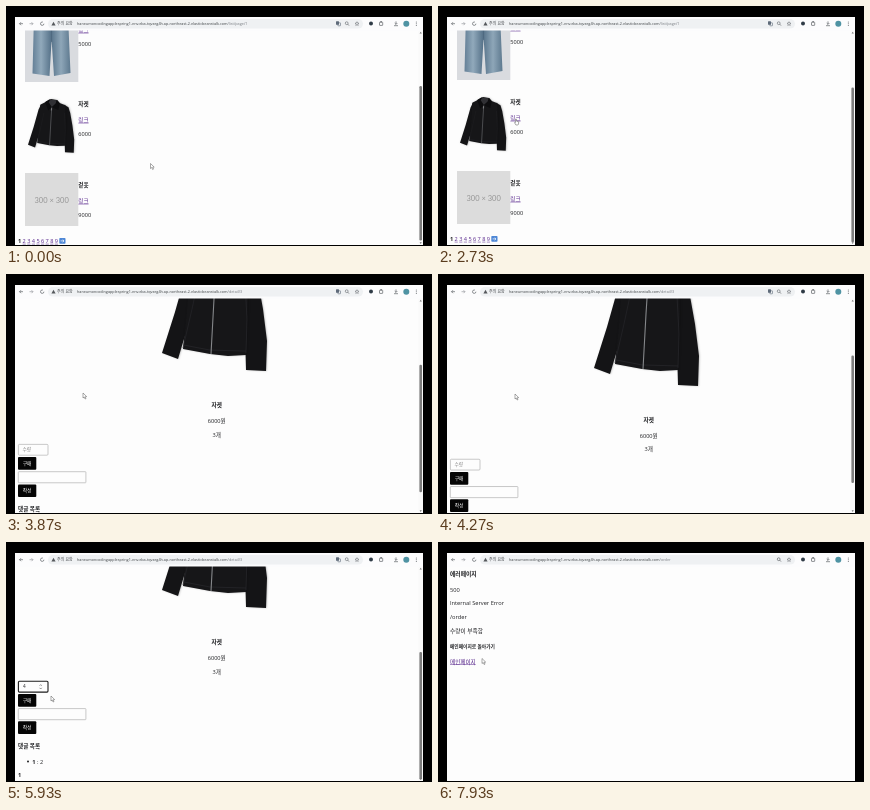
Recreate the animation shown at these times as an HTML page with a canvas. Size 426 by 240 pixels, loop 8 s.

```html
<!DOCTYPE html>
<html lang="ko">
<head>
<meta charset="utf-8">
<title>Shop walkthrough</title>
<style>
html, body { margin: 0; width: 100%; height: 100%; overflow: hidden; background: #000; }
canvas { display: block; width: 426px; height: 240px; }
</style>
</head>
<body>
<canvas id="stage"></canvas>
<script>
const LOOP = 8000, FPS = 15;
const INK = '#202124', LINK = '#55238a', GRAY = '#5f6368';
const FONT = '"Open Sans", "Noto Sans CJK KR", "Noto Sans CJK", sans-serif';
const HOST = 'haneumoncodingapplespring1-env.eba-tqvzeg4h.ap-northeast-2.elasticbeanstalk.com';

const canvas = document.getElementById('stage');
const ctx = canvas.getContext('2d');
const ratio = Math.max(1, window.devicePixelRatio || 1);
canvas.width = 426 * ratio;
canvas.height = 240 * ratio;

// Keyframes: [time, value, value...]
const pointer = [
  [0, 144.5, 157.5], [1933, 144.5, 157.5], [2733, 76.5, 113], [2800, 76, 112],
  [3467, 76, 112], [3867, 77, 119], [4267, 77, 120], [4333, 77, 120],
  [4600, 30, 142], [4867, 64, 143], [5200, 64, 143], [5267, 65, 143],
  [5867, 65, 143], [5933, 45, 154], [6133, 21, 156], [7200, 21, 156],
  [7467, 42, 118], [7800, 42, 118], [7933, 44, 116.5]
];
const listScroll = [[1200, 0], [1333, 1.5], [1400, 2]];
const itemScroll = [
  [3467, 0], [3867, 105], [4000, 122], [4067, 122], [4267, 90],
  [4333, 87], [4400, 92], [4667, 126], [4867, 136]
];

const linear = u => u;
const smooth = u => u * u * (3 - 2 * u);

function sample(keys, t, ease = linear) {
  if (t <= keys[0][0]) return keys[0].slice(1);
  for (let i = 1; i < keys.length; i++) {
    const a = keys[i - 1], b = keys[i];
    if (t < b[0]) {
      const u = ease((t - a[0]) / (b[0] - a[0]));
      return a.slice(1).map((v, k) => v + (b[k + 1] - v) * u);
    }
  }
  return keys[keys.length - 1].slice(1);
}

function rect(x, y, w, h, fill, r = 0) {
  ctx.fillStyle = fill;
  ctx.beginPath();
  ctx.roundRect(x, y, w, h, r);
  ctx.fill();
}

function frame(x, y, w, h, color, line, r) {
  ctx.strokeStyle = color;
  ctx.lineWidth = line;
  ctx.beginPath();
  ctx.roundRect(x, y, w, h, r);
  ctx.stroke();
}

function circle(x, y, r, fill) {
  ctx.fillStyle = fill;
  ctx.beginPath();
  ctx.arc(x, y, r, 0, 7);
  ctx.fill();
}

function trace(points) {
  ctx.beginPath();
  for (let i = 0; i < points.length; i += 2) ctx.lineTo(points[i], points[i + 1]);
}

function poly(points, fill) {
  trace(points);
  ctx.closePath();
  ctx.fillStyle = fill;
  ctx.fill();
}

function line(points, color, width = 0.7) {
  trace(points);
  ctx.strokeStyle = color;
  ctx.lineWidth = width;
  ctx.stroke();
}

// y is the middle of the capitals; returns the text width
function text(s, x, y, { size = 5.6, color = INK, weight = 400, align = 'left', under = false, font = FONT } = {}) {
  ctx.font = `${weight} ${size}px ${font}`;
  ctx.fillStyle = color;
  ctx.textAlign = align;
  ctx.fillText(s, x, y + size * 0.36);
  const w = ctx.measureText(s).width;
  if (under) rect(x, y + size * 0.5, w, 0.5, color);
  return w;
}

const bold = (s, x, y, opts) => text(s, x, y, { weight: 700, ...opts });
const link = (s, x, y) => text(s, x, y, { color: LINK, under: true });

function toolbar(path, translate) {
  rect(9, 11, 408, 13.5, '#fcfcfd');
  rect(42, 13, 315, 9.6, '#eff1f3', 4.8);
  line([17, 17.7, 13.5, 17.7], GRAY);
  line([15, 16.2, 13.5, 17.7, 15, 19.2], GRAY);
  line([23.5, 17.7, 27, 17.7], '#9a9da1');
  line([25.5, 16.2, 27, 17.7, 25.5, 19.2], '#9a9da1');
  ctx.beginPath();
  ctx.arc(36.2, 17.7, 1.7, 0, 5.2);
  ctx.strokeStyle = GRAY;
  ctx.lineWidth = 0.7;
  ctx.stroke();
  poly([47.5, 15.7, 49.6, 19.4, 45.4, 19.4], '#55585c');
  text('주의 요함', 51, 17.7, { size: 4, color: '#44474b' });
  const w = text(HOST, 71, 17.7, { size: 3.77, color: '#3c4043' });
  text(path, 71 + w, 17.7, { size: 3.77, color: '#777b80' });

  if (translate) {
    rect(330, 15.3, 3, 3.4, '#5f6b7a', 0.5);
    frame(331.8, 16.8, 2.7, 3, '#5f6b7a', 0.6, 0.4);
  }
  ctx.strokeStyle = GRAY;
  ctx.beginPath();
  ctx.arc(340.7, 17.2, 1.4, 0, 7);
  ctx.stroke();
  line([341.8, 18.2, 343, 19.6], GRAY);
  const star = [];
  for (let i = 0; i < 11; i++) {
    const a = i * Math.PI / 5 - Math.PI / 2, r = i % 2 ? 0.9 : 2.1;
    star.push(351 + r * Math.cos(a), 17.8 + r * Math.sin(a));
  }
  line(star, GRAY, 0.5);
  circle(365, 17.6, 2, '#2f3b46');
  frame(373.5, 16.2, 3.2, 3.2, GRAY, 0.7, 0.4);
  circle(375.1, 15.8, 0.8, GRAY);
  line([390, 15.4, 390, 18.3], GRAY);
  line([388.7, 17.1, 390, 18.4, 391.3, 17.1], GRAY);
  line([388, 19.7, 392, 19.7], GRAY);
  circle(400.3, 17.7, 3, '#4f93a3');
  for (const y of [16, 17.7, 19.4]) circle(410.3, y, 0.5, GRAY);
}

function scrollbar(y, h) {
  rect(412.5, 24.5, 4.5, 214.5, '#fafafa');
  rect(413.4, y, 2.6, h, '#7d7d7d', 1.2);
  poly([414.7, 25.7, 415.8, 27.5, 413.6, 27.5], '#777');
  poly([414.7, 238, 415.8, 236.2, 413.6, 236.2], '#777');
}

// Drawn in item-page units
function jacket() {
  const sleeveL = [186, 92, 180, 104, 169, 143, 156, 184, 172, 190, 181, 160, 192, 120];
  const sleeveR = [238, 93, 248, 99, 252, 112, 257, 140, 261, 172, 260, 202, 240, 201, 239, 165, 231, 120];
  ctx.save();
  ctx.shadowColor = 'rgba(0,0,0,.25)';
  ctx.shadowBlur = 2 * ratio;
  ctx.shadowOffsetX = ratio * 0.7;
  poly(sleeveL, '#141416');
  poly(sleeveR, '#141416');
  poly([184, 93, 196, 87, 208, 80, 222, 82, 228, 89, 241, 94, 242, 130, 240, 186, 222, 187, 204, 185, 177, 180, 181, 140], '#161618');
  ctx.restore();
  poly([202, 86, 208, 81.5, 221, 83, 219, 91, 210, 98], '#303034');
  poly([195, 87, 206, 80, 203, 88, 210, 99, 202, 106], '#0d0d0f');
  poly([222, 82, 228, 89, 225, 105, 210, 99, 219, 90], '#0d0d0f');
  line([192, 112, 186, 140, 177, 179], '#26262a');
  line([239, 112, 241, 150, 240, 184], '#29292d');
  line([178, 176, 204, 181, 240, 182], '#29292d');
  line([210, 99, 208, 130, 205, 185], '#85878a', 1.1);
  line([209.5, 101, 209, 106], '#c2c4c6', 1.1);
}

function jeans() {
  const cloth = ctx.createLinearGradient(25, 0, 65, 0);
  cloth.addColorStop(0, '#5c7890');
  cloth.addColorStop(0.25, '#91a9bb');
  cloth.addColorStop(0.5, '#57738a');
  cloth.addColorStop(0.75, '#8ea6b8');
  cloth.addColorStop(1, '#5b778d');
  rect(19, 0, 53.3, 76, '#d9dbdf');
  poly([28, 10, 62, 10, 64.5, 67, 48, 70, 45.6, 34, 43.5, 70, 26.5, 67.5], cloth);
  line([45.5, 18, 45.6, 36], '#49637a');
}

function listPage(t) {
  const s = sample(listScroll, t)[0];
  ctx.save();
  ctx.translate(0, -s);
  jeans();
  link('링크', 72.3, 24);
  text('5000', 72.3, 38);

  ctx.save();
  ctx.translate(22, 93);
  ctx.scale(0.44, 0.44);
  ctx.translate(-156, -80);
  jacket();
  ctx.restore();
  bold('자켓', 72.3, 98);
  link('링크', 72.3, 114);
  text('6000', 72.3, 128);

  rect(19, 167, 53.3, 53, '#dcdcdc');
  text('300 × 300', 45.6, 194, { size: 7.5, color: '#969696', align: 'center', font: 'Lato, sans-serif' });
  bold('겉옷', 72.3, 179);
  link('링크', 72.3, 195);
  text('9000', 72.3, 208.5);

  bold('1', 12, 235);
  for (let n = 2; n < 10; n++) link(String(n), 16.6 + (n - 2) * 4.6, 235);
  rect(53.3, 232, 6.2, 5.8, '#4d87d6', 0.8);
  line([54.6, 234.9, 58, 234.9], '#fff');
  line([56.7, 233.6, 58, 234.9, 56.7, 236.2], '#fff');
  ctx.restore();
  scrollbar(80 + s * 0.8, 154.5);
}

function button(label, y) {
  rect(12, y, 18.3, 12.7, '#050505', 1);
  text(label, 21.1, y + 6.3, { size: 4.8, color: '#fff', align: 'center' });
}

function itemPage(t) {
  const s = sample(itemScroll, t)[0];
  const focused = t >= 4660;
  ctx.save();
  ctx.translate(0, -s);
  bold('TirbenMall', 15.7, 35.5, { size: 5.5 });
  const nav = [['Mainpage', 48.3], ['List', 76.3], ['siteTrialA', 88.3], ['Write', 118], ['MyPage', 136], ['Logout', 160]];
  nav.forEach(([label, x], i) => text(label, x, 35.5, { size: 5.55, color: i === 2 ? INK : LINK }));
  bold('상세페이지', 210.7, 54.5, { size: 5.8, align: 'center' });
  jacket();
  bold('자켓', 210.7, 236, { align: 'center' });
  text('6000원', 210.7, 251.7, { align: 'center' });
  text('3개', 210.7, 265.5, { align: 'center' });

  frame(12.4, 275.3, 29.6, 10.8, focused ? '#1c1c1c' : '#a5a5a5', focused ? 1.1 : 0.6, 1);
  if (t < 5260) text('수량', 16.5, 280.7, { size: 4.7, color: '#8a8a8a' });
  else if (t < 5530) text('1', 17, 280.7, { size: 4.7 });
  else if (t >= 5590) text('4', 17, 280.7, { size: 4.7 });
  if (focused) {
    line([33.6, 279.8, 34.7, 278.6, 35.8, 279.8], '#555', 0.6);
    line([33.6, 281.8, 34.7, 283, 35.8, 281.8], '#555', 0.6);
  }
  button('구매', 288);
  frame(12.3, 302.6, 67.6, 11.1, '#a5a5a5', 0.6, 0.6);
  button('작성', 315.3);
  bold('댓글 목록', 12, 339.5);
  circle(22, 355.5, 1, INK);
  const w = bold('1', 26.3, 355.5);
  text(' : 2', 26.3 + w, 355.5);
  bold('1', 12, 369.3);
  ctx.restore();
  scrollbar(26 + s * 0.617, 127.5);
}

function errorPage() {
  bold('에러페이지', 12, 31.7, { size: 5.8 });
  ['500', 'Internal Server Error', '/order', '수량이 부족함'].forEach((s, i) => text(s, 12, 47.7 + i * 13.7, { size: 5.7 }));
  bold('메인페이지로 돌아가기', 12, 104, { size: 4.75 });
  link('메인페이지', 12, 119.5);
}

function drawPointer(t) {
  const [x, y] = sample(pointer, t, smooth);
  const hand = (t > 2660 && t < 3060) || t >= 6130 && t < 6790;
  const shape = hand
    ? [1, 0, 2, 0.2, 2.1, 2.2, 4.2, 2.8, 4, 5.2, 3.4, 6, 1.4, 6, 0, 3.6, 1, 3.5]
    : [0, 0, 0, 5, 1.2, 4, 2.1, 6, 3, 5.6, 2.2, 3.7, 3.7, 3.6];
  ctx.save();
  ctx.translate(x, y);
  poly(shape, '#fff');
  ctx.strokeStyle = '#555';
  ctx.lineWidth = 0.5;
  ctx.stroke();
  ctx.restore();
}

function draw(t) {
  ctx.setTransform(ratio, 0, 0, ratio, 0, 0);
  rect(0, 0, 426, 240, '#000');
  ctx.save();
  ctx.beginPath();
  ctx.rect(9, 11, 408, 228);
  ctx.clip();
  rect(9, 11, 408, 228, '#fdfdfd');
  let path = '/list/page/1';
  if (t < 3060) listPage(t);
  else if (t < 6790) { path = '/detail/3'; itemPage(t); }
  else { path = '/order'; errorPage(); }
  toolbar(path, t < 6790);
  drawPointer(t);
  ctx.restore();
}

const start = performance.now();
function tick() {
  const t = (performance.now() - start) % LOOP;
  draw(Math.floor((t + 4) * FPS / 1000) * 1000 / FPS);
  requestAnimationFrame(tick);
}
tick();
</script>
</body>
</html>
```
